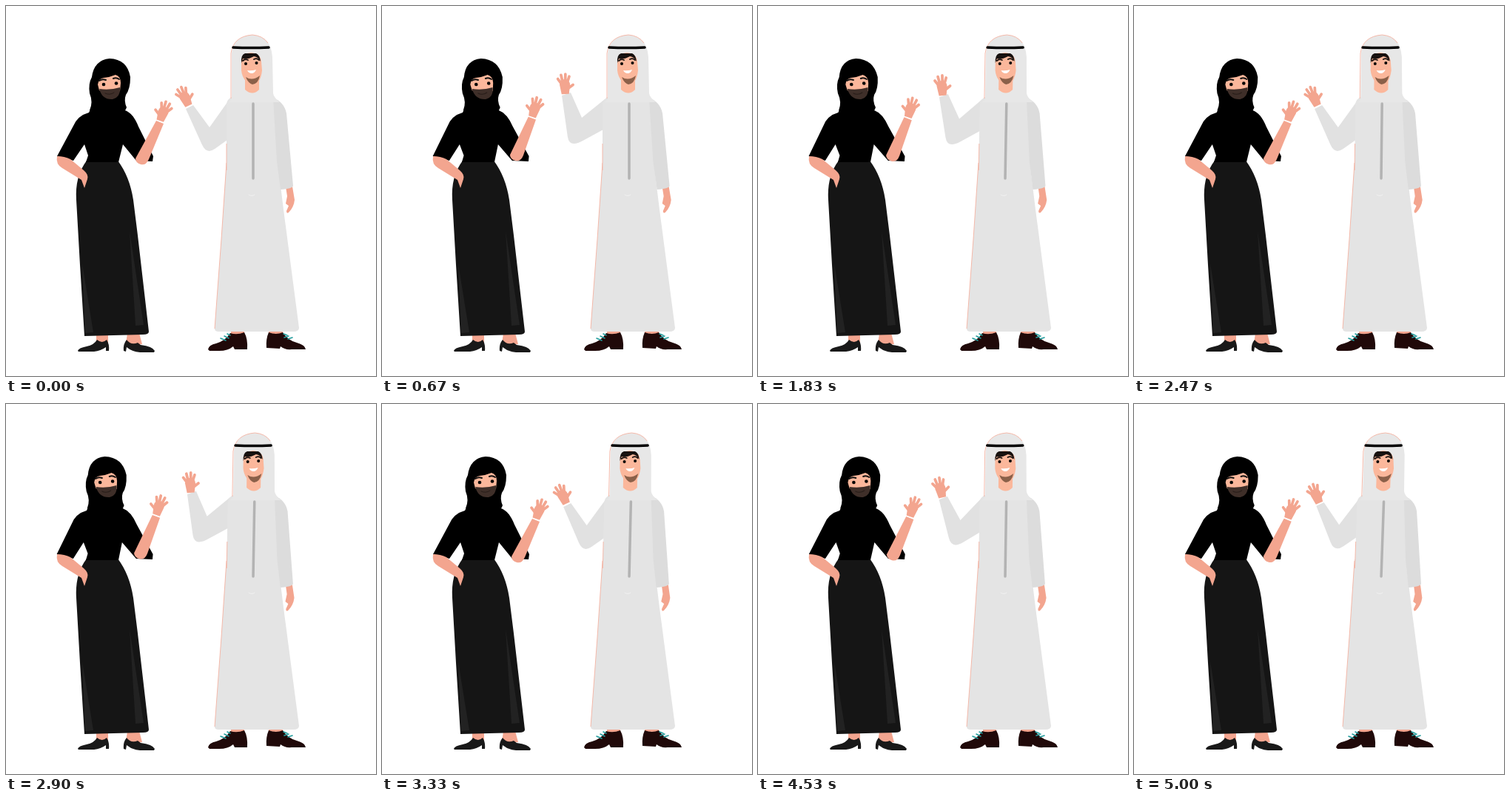
An HTML page for the animation above (5030 ms loop, 500 by 500 pixels).

```html
<!DOCTYPE html>
<html lang="en">
<head>
<meta charset="utf-8">
<title>Waving couple</title>
<style>
  html, body { margin: 0; width: 100%; height: 100%; overflow: hidden; background: #fff; }
  svg { display: block; width: 100vw; height: 100vh; }
  .skin { fill: #f3a58f; }
  .face { fill: #fbb79b; }
  .robe { fill: #e4e4e4; }
  .line { fill: none; stroke-linecap: round; stroke-linejoin: round; }
  .edge { fill: none; stroke: #f4b3a2; stroke-width: .9; }
</style>
</head>
<body>
<svg viewBox="0 0 500 500">
  <defs>
    <g id="palm">
      <path class="skin" d="M-5 14 L-7 1 Q-7 -6 0 -6 Q7 -5 7 2 Q6 8 5 14 Z"/>
      <path class="line" stroke="#f3a58f" stroke-width="3.7" d="M-5 -1 L-9 -7 M-3 -4 L-4.5 -12 M1 -4 L1.5 -13 M4 -3 L6.5 -9.500 M5 6 L11 2"/>
    </g>
  </defs>

  <g id="woman">
    <path class="skin" d="M122 442 H138 V455 H122 Z M164 442 H180 L184 457 H162 Z"/>
    <path fill="#191919" d="M97 466 Q98 462 109 460 Q119 458 123 451 Q130 457 136 451 Q140 457 139 466 H135 V461 Q128 466 119 467 H98 Z
      M159 466 Q158 457 163 451 Q169 459 178 455 L182 458 Q198 460 201 466 L200 468 H181 Q170 467 163 461 L162 467 Z"/>
    <path fill="#151515" d="M109 209 H151 Q167 230 172 262 L178 310 L193 440 Q193 444 185 444 L106 446 L100 350 L95 262 Q93 230 109 209 Z"/>
    <path fill="#222" d="M167 304 L186 431 L175 432 Z M103 348 L107 442 L118 441 Z"/>
    <g id="womanTop">
      <path d="M112 144 Q97 148 91 162 L69 203 Q82 206 91 209 L106 187 L111 202 L108 211 H152 L158 187 L176 209 L198 210 L199 203 L179 163 Q172 145 161 141 L150 128 H120 Z"/>
      <g id="womanArm">
        <path class="skin" d="M175 206 L203 155 L213 159 L193 207 Q189 216 182 214 Q175 212 175 206 Z"/>
        <use href="#palm" transform="translate(213 142) rotate(20) scale(-1 1)"/>
      </g>
      <g id="womanHead">
        <path d="M140 71 Q164 72 168 96 Q168 112 162 120 Q159 128 163 137 Q159 149 139 149 Q119 150 113 141 Q118 130 113 118 Q111 105 116 96 Q119 73 140 71 Z"/>
        <path class="face" d="M124 106 Q125 98 132 97 Q141 96 148 93 Q155 95 155 104 L154 115 Q143 119 126 114 Z"/>
        <path fill="#3f2f29" d="M126 112 Q141 114 154 110 Q155 123 144 126 Q130 127 126 112 Z"/>
        <path class="line" stroke="#281d19" stroke-width="1" d="M134 118 Q140 121 146 117"/>
        <path class="line" stroke="#111" stroke-width="2" d="M126 101 Q130 98 135 100 M145 98 Q149 96 153 99"/>
        <circle cx="132" cy="106" r="2.3"/><circle cx="149" cy="104.500" r="2.3"/>
      </g>
    </g>
    <path class="skin" d="M69 203 Q79 203 87 207 L105 222 Q112 228 110 234 L106 246 L102 235 L76 219 Q67 214 69 203 Z"/>
  </g>

  <g id="man">
    <path class="skin" d="M304 437 H322 V445 H304 Z M355 437 H374 V445 H355 Z"/>
    <path fill="#200909" d="M273 464 Q274 458 284 456 Q297 452 303 442 Q312 445 322 441 Q327 450 326 464 H309 L307 460 Q300 466 288 466 H275 Z
      M352 462 Q351 450 355 441 Q365 445 374 441 Q381 452 393 455 Q404 458 405 464 H386 Q377 465 371 460 L370 463 Z"/>
    <path class="line" stroke="#229c9c" stroke-width="1.600" d="M290 449 l7 3 M295 446 l6 3 M299 443 l4 2 M375 443 l5 2 M376 448 l6 -2 M381 450 l6 -2"/>
    <path class="robe" d="M298 210 H367 L375 275 L396 435 Q396 440 388 440 H288 Q281 440 282 435 L291 315 Z"/>
    <path class="edge" d="M298 212 L291 315 L282 436"/>
    <g id="manTop">
      <g id="manArm">
        <path id="sleeve" fill="#e1e1e1"/>
        <use id="manHand" href="#palm"/>
      </g>
      <path class="robe" d="M305 123 Q299 126 298 132 V225 H368 L376 145 Q375 131 361 124 Z"/>
      <path class="edge" d="M298 186 V222"/>
      <g id="hanging">
        <path class="skin" d="M378 244 H387 L390 262 Q389 272 382 279 Q379 281 379 277 L382 270 L378 267 L380 257 Z"/>
        <path fill="#dcdcdc" d="M361 124 Q376 130 379 145 L388 243 Q387 247 371 248 L366 210 Z"/>
      </g>
      <path fill="#e7e7e7" d="M305 126 V64 Q307 41 333 39 Q358 41 360 69 L361 118 Q362 124 370 130 H301 Z"/>
      <path class="edge" d="M304 125 V64 Q307 41 333 39 Q347 40 354 50"/>
      <path class="face" d="M323 95 H342 V113 Q333 122 323 113 Z"/>
      <path class="face" d="M318 72 Q319 64 331 63 Q344 64 345 75 L346 87 Q344 106 333 106 Q320 103 318 87 Z"/>
      <path fill="#8b6049" d="M324 96 Q333 102 343 94 Q341 105 333 106 Q327 104 324 96 Z"/>
      <path fill="#17110f" d="M318 77 Q317 66 323 64 H338 Q343 66 344 75 Q341 69 335 68 Q326 73 320 71 Z"/>
      <path class="line" stroke="#17110f" stroke-width="1.800" d="M320 74 Q323 71 327 73 M335 72 Q339 70 342 73"/>
      <circle cx="324" cy="78" r="2"/><circle cx="338.500" cy="77" r="2"/>
      <path fill="#fff" d="M326 87 Q332 88 338 86 Q336 91 332 91 Q328 91 326 87 Z"/>
      <path class="line" stroke="#000" stroke-width="3.500" stroke-linecap="butt" d="M307 56 Q331 57 355 56"/>
      <path class="line" stroke="#b3b3b3" stroke-width="3.500" stroke-linecap="butt" d="M334 132 V233"/>
    </g>
    <path class="line" stroke="#f2f2f2" stroke-width="1" d="M328 255 q4 3 8 0"/>
  </g>
</svg>
<script>
const LOOP = 5.03;
const el = id => document.getElementById(id);
const mix = (a, b, k) => a + (b - a) * k;

// [time, offset] keys for the slow body sway
const MAN_SWAY = [[0, 0], [.67, 0], [1.23, 4], [2.47, 2], [3.33, 4], [4.07, -.5], [5, 6]];
const WOMAN_SWAY = [[0, 0], [.67, 0], [1.23, -2.5], [2.47, -.7], [3.33, 0], [5, 0]];
const WAVES = [.66, 1.75, 2.85, 3.7, 4.7];
const SWINGS = [.5, 1.66, 3.75, 4.82];

// sleeve corners: shoulder, crook, wrist, wrist, elbow, armpit
const ARM_LOW = [[302, 126], [275, 164], [253, 134], [243, 139], [271, 201], [299, 181]];
const ARM_HIGH = [[301, 126], [270, 151], [255, 117], [243, 121], [253, 192], [299, 167]];

function follow(keys, t) {
  const i = keys.findIndex(key => key[0] > t);
  if (i < 0) return keys[keys.length - 1][1];
  const [t0, a] = keys[i - 1], [t1, b] = keys[i];
  const u = (t - t0) / (t1 - t0);
  return mix(a, b, u * u * (3 - 2 * u));
}

function pulse(peaks, width, t) {
  const d = Math.min(...peaks.map(p => Math.abs(t - p))) / width;
  return d < 1 ? Math.cos(d * Math.PI / 2) ** 2 : 0;
}

// leans everything above the pivot; shift is reached at head height
function lean(id, shift, head, pivot) {
  const k = shift / (pivot - head);
  el(id).setAttribute("transform", `matrix(1 0 ${-k} 1 ${k * pivot} 0)`);
}

function drawSleeve(raise) {
  const [shoulder, crook, inner, outer, elbow, pit] = ARM_LOW.map((p, i) =>
    p.map((v, axis) => mix(v, ARM_HIGH[i][axis], raise)));
  const before = elbow.map((v, i) => mix(v, outer[i], .22));
  const after = elbow.map((v, i) => mix(v, pit[i], .4));
  el("sleeve").setAttribute("d",
    `M${shoulder}L${crook}L${inner}L${outer}L${before}Q${elbow} ${after}L${pit}Z`);
  el("manHand").setAttribute("transform",
    `translate(${mix(241, 247, raise)} ${mix(122, 105, raise)}) rotate(${mix(-25, -3, raise)})`);
}

function render(t) {
  const wave = pulse(WAVES, .36, t);
  const swing = pulse(SWINGS, .2, t);
  lean("manTop", follow(MAN_SWAY, t), 60, 235);
  lean("womanTop", follow(WOMAN_SWAY, t) - 5 * wave, 100, 212);
  drawSleeve(wave);
  el("hanging").setAttribute("transform", `rotate(${-6.5 * swing} 370 140)`);
  el("womanArm").setAttribute("transform",
    `translate(${-1.5 * wave} ${-5 * wave}) rotate(${-wave} 184 210)`);
}

function tick() {
  render(performance.now() / 1000 % LOOP);
  requestAnimationFrame(tick);
}
tick();
</script>
</body>
</html>
```
